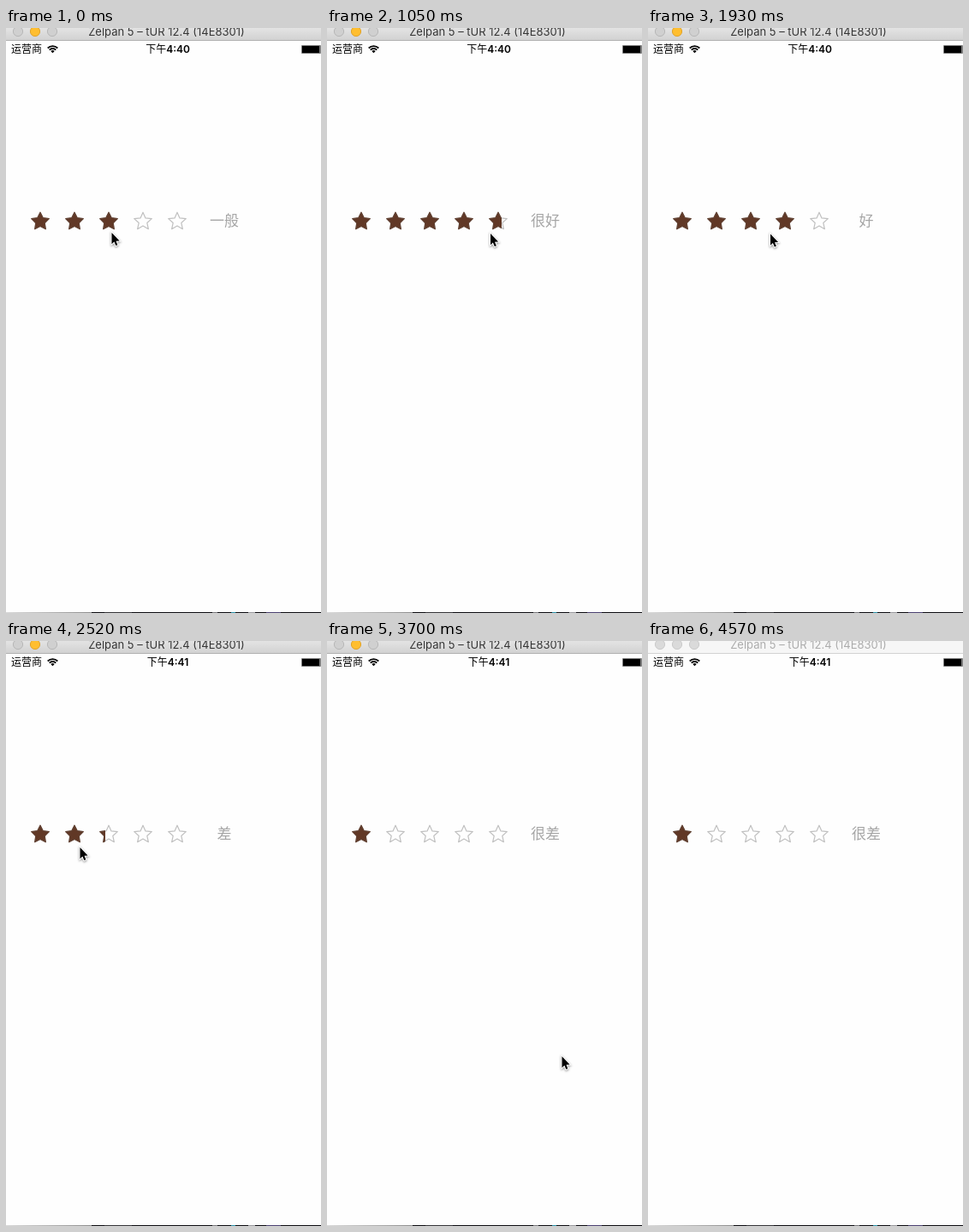
Recreate the animation shown at these times as an HTML page with a canvas. Size 368 px wide and 683 px high, loop 4670 ms.

```html
<!DOCTYPE html>
<html lang="zh">
<head>
<meta charset="utf-8">
<title>Star rating</title>
<style>
html, body { margin: 0; width: 100%; height: 100%; overflow: hidden; background: #fefefe; }
canvas { display: block; width: 368px; height: 683px; }
</style>
</head>
<body>
<canvas id="stage"></canvas>
<script>
const W = 368, H = 683, LOOP = 4670, TICK = 147.6;
const INACTIVE_AT = 4570, MINUTE_AT = 2080;
const CELL = 40, LEFT = 20;
const LABELS = ['', '很差', '差', '一般', '好', '很好'];
const LATIN = 'Inter, "Noto Sans CJK SC", "Noto Sans CJK", sans-serif';
const CJK = '"Noto Sans CJK SC", "Noto Sans CJK", sans-serif';

// Pointer turning points: tick, x, y
const PATH = [
  [1, 123, 238], [4, 165, 239], [8, 199, 239], [9, 199, 239], [17, 86, 240],
  [19, 29, 240], [20, 50.5, 240], [25, 274, 484], [29, 335, 668]
];
const TAPS = [0, 3, 7, 12, 15, 17, 19];

const canvas = document.getElementById('stage');
const ctx = canvas.getContext('2d');
const dpr = window.devicePixelRatio || 1;
canvas.width = W * dpr;
canvas.height = H * dpr;

function pointerAt(tick) {
  const n = Math.min(Math.max(tick, PATH[0][0]), PATH[PATH.length - 1][0]);
  const i = PATH.findIndex((p, k) => k > 0 && n <= p[0]);
  const [n0, x0, y0] = PATH[i - 1], [n1, x1, y1] = PATH[i];
  const k = (n - n0) / (n1 - n0);
  return { x: x0 + (x1 - x0) * k, y: y0 + (y1 - y0) * k };
}

// A tap rates with the star under the pointer
const ratingAt = tick => Math.ceil((pointerAt(tick).x - LEFT) / CELL);

function ratingState(tick) {
  const past = TAPS.filter(n => n <= tick);
  const tap = past.pop();
  const rating = ratingAt(tap);
  const before = past.length ? ratingAt(past.pop()) : rating;
  const rest = Math.max(0, 0.4 - (tick - tap));
  return { rating, filled: rating + (before - rating) * rest };
}

function rect(x, y, w, h, color) {
  ctx.fillStyle = color;
  ctx.fillRect(x, y, w, h);
}

function text(str, x, y, font, color, align = 'center') {
  ctx.font = font;
  ctx.fillStyle = color;
  ctx.textAlign = align;
  ctx.fillText(str, x, y);
}

function polygon(points) {
  ctx.beginPath();
  for (const [x, y] of points) ctx.lineTo(x, y);
  ctx.closePath();
}

function light(x, fill, edge) {
  ctx.beginPath();
  ctx.arc(x, 4, 5.6, 0, Math.PI * 2);
  ctx.fillStyle = fill;
  ctx.fill();
  ctx.strokeStyle = edge;
  ctx.lineWidth = 1;
  ctx.stroke();
}

function titleBar(active) {
  const shade = ctx.createLinearGradient(0, 0, 0, 14);
  shade.addColorStop(0, active ? '#e3e3e3' : '#f6f6f6');
  shade.addColorStop(1, active ? '#d2d2d2' : '#f6f6f6');
  rect(0, 0, W, 14, shade);
  rect(0, 14, W, 1, active ? '#b1b1b1' : '#d3d3d3');
  for (const x of [14, 34, 54]) {
    if (active && x === 34) light(x, '#ffbe2f', '#e0a32c');
    else light(x, active ? '#d0d0d0' : '#dadada', active ? '#b7b7b7' : '#cacaca');
  }
  text('Zelpan 5 – tUR 12.4 (14E8301)', 187.5, 9, '13px ' + LATIN, active ? '#363636' : '#acacac');
}

function wifi(x, y) {
  const a = -Math.PI * 0.75, b = -Math.PI * 0.25;
  ctx.strokeStyle = ctx.fillStyle = '#000';
  ctx.lineWidth = 1.8;
  for (const r of [5.3, 8.2]) {
    ctx.beginPath();
    ctx.arc(x, y, r, a, b);
    ctx.stroke();
  }
  ctx.beginPath();
  ctx.moveTo(x, y);
  ctx.arc(x, y, 3.1, a, b);
  ctx.fill();
}

function statusBar(time) {
  const font = '600 12px ' + LATIN;
  text('运营商', 6, 29.4, '12px ' + CJK, '#000', 'left');
  wifi(54.5, 29.3);
  ctx.font = font;
  const left = 189 - (24 + ctx.measureText(time).width) / 2;
  text('下午', left, 29.4, '500 12px ' + CJK, '#000', 'left');
  text(time, left + 24, 29.3, font, '#000', 'left');
  ctx.strokeStyle = '#7c7c7c';
  ctx.lineWidth = 1;
  ctx.strokeRect(345.5, 20.5, 22, 9);
  rect(346, 21, 20.5, 8, '#000');
}

function starPath(i, inner) {
  const points = [], R = 10.8, cx = LEFT + CELL * (i + 0.5);
  for (let k = 0; k < 10; k++) {
    const r = k % 2 ? R * inner : R;
    const a = k * Math.PI / 5 - Math.PI / 2;
    points.push([cx + r * Math.cos(a), 226 + r * Math.sin(a)]);
  }
  polygon(points);
}

function stars(filled) {
  ctx.lineJoin = 'round';
  ctx.lineWidth = 1.2;
  ctx.strokeStyle = '#c0c0c0';
  for (let i = 0; i < 5; i++) {
    starPath(i, 0.47);
    ctx.stroke();
  }
  ctx.save();
  ctx.beginPath();
  ctx.rect(LEFT, 205, filled * CELL, 40);
  ctx.clip();
  ctx.fillStyle = '#613826';
  ctx.strokeStyle = '#624233';
  for (let i = 0; i < filled; i++) {
    starPath(i, 0.51);
    ctx.fill();
    ctx.stroke();
  }
  ctx.restore();
}

// The strip of desktop showing below the window
function bottomEdge() {
  const fade = ctx.createLinearGradient(0, 0, 100, 0);
  fade.addColorStop(0, '#d8d8d8');
  fade.addColorStop(1, '#8c8c8c');
  rect(0, 682, 100, 1, fade);
  rect(100, 682, 268, 1, '#0b0b10');
  rect(115, 682, 32, 1, '#333337');
  rect(241, 682, 6, 1, '#77777b');
  rect(263, 682, 5, 1, '#2b90a6');
  rect(283, 682, 8, 1, '#98989c');
  rect(304, 682, 17, 1, '#4a4070');
}

function pointer({ x, y }) {
  ctx.save();
  ctx.translate(x + 0.5, y + 1);
  polygon([[0, 0], [0, 13.2], [2.9, 10.5], [4.8, 15.1], [6.9, 14.2], [5, 9.7], [9.1, 9.5]]);
  ctx.lineJoin = 'miter';
  ctx.miterLimit = 3;
  ctx.shadowColor = 'rgba(0,0,0,0.45)';
  ctx.shadowBlur = 2.5 * dpr;
  ctx.shadowOffsetY = dpr;
  ctx.strokeStyle = '#fff';
  ctx.lineWidth = 2;
  ctx.stroke();
  ctx.shadowColor = 'transparent';
  ctx.fillStyle = '#000';
  ctx.fill();
  ctx.restore();
}

function draw(t) {
  const active = t < INACTIVE_AT;
  const tick = Math.floor(t / TICK);
  const { rating, filled } = ratingState(tick);
  ctx.setTransform(dpr, 0, 0, dpr, 0, 0);
  rect(0, 0, W, H, '#fefefe');
  titleBar(active);
  statusBar(t < MINUTE_AT ? '4:40' : '4:41');
  stars(filled);
  text(LABELS[rating], 255, 231, '17px ' + CJK, '#a6a6a6');
  bottomEdge();
  if (active) pointer(pointerAt(tick));
}

const start = performance.now();
function frame() {
  draw((performance.now() - start) % LOOP);
  requestAnimationFrame(frame);
}
frame();
</script>
</body>
</html>
```
